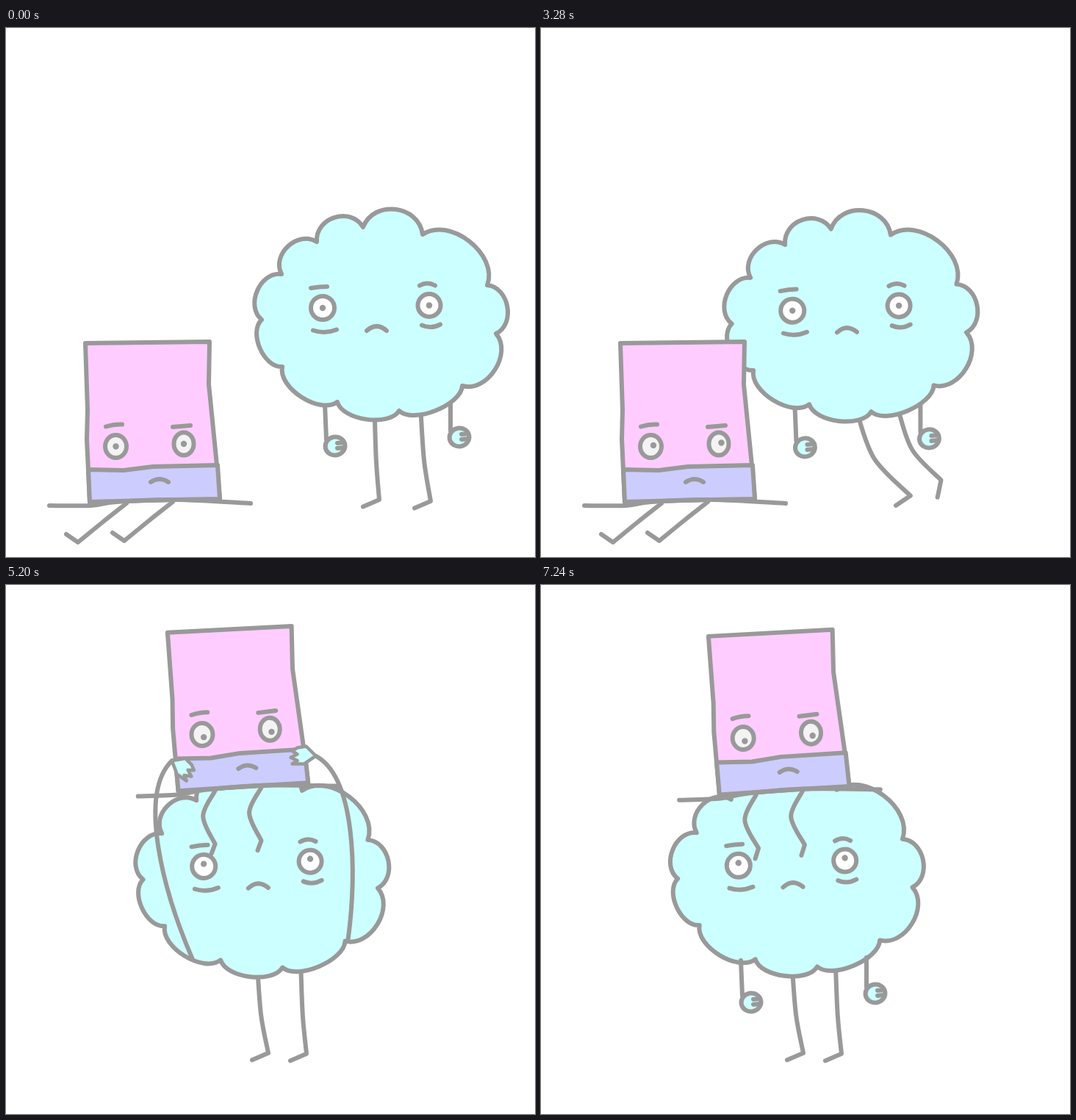
An HTML page with a canvas that plays this animation: 720 px wide and 720 px high, repeating every 8000 ms.

```html
<!DOCTYPE html>
<html lang="en">
<head>
<meta charset="utf-8">
<title>Cloud and hat</title>
<style>
  html, body { margin: 0; width: 100%; height: 100%; overflow: hidden; background: #fff; }
  canvas { display: block; width: 100vw; height: 100vh; }
</style>
</head>
<body>
<canvas id="stage" width="720" height="720"></canvas>
<script>
const ctx = document.getElementById('stage').getContext('2d');
const LOOP = 8000, STEP = 40;
const INK = '#999', CYAN = '#cff', PINK = '#fcf', LILAC = '#ccf';

/* ---------- timing and vector helpers ---------- */

const clamp = v => Math.max(0, Math.min(1, v));
const ramp = (t, a, b) => clamp((t - a) / (b - a));
const ease = p => p * p * (3 - 2 * p);
const pulse = (t, a, b) => Math.sin(Math.PI * ramp(t, a, b));
const rad = deg => deg * Math.PI / 180;
const mix = (a, b, k) => a.map((v, i) => v + (b[i] - v) * k);
const add = (a, x, y) => [a[0] + x, a[1] + y];
const spin = ([x, y], deg) => {
  const c = Math.cos(rad(deg)), s = Math.sin(rad(deg));
  return [x * c - y * s, x * s + y * c];
};

/* ---------- the story: everything follows from the time ---------- */

function poseAt(t) {
  const walk = ramp(t, 2840, 3600), lift = ease(ramp(t, 4920, 5240));
  const crouch = 11 * ramp(t, 3440, 3600) + 15 * ramp(t, 3720, 3920);
  const wobble = pulse(t, 6040, 6200) + pulse(t, 6560, 6720);
  const settle = ramp(t, 6560, 6720);
  const glance = ramp(t, 1920, 2000) - ramp(t, 2360, 2440);
  const notice = ramp(t, 1360, 1640);
  return {
    t, lift,
    cloud: {
      x: -153 * walk - 9 * lift,
      y: crouch - 27 * lift - 4 * Math.sin(2 * Math.PI * walk) + 4 * pulse(t, 5360, 5560),
      tilt: -1.3 * clamp(walk * 2),
      look: [-4 * glance, -3.5 * lift],
      open: 1 - .9 * (pulse(t, 680, 880) + pulse(t, 2640, 2720) + pulse(t, 4240, 4360))
    },
    hat: {
      x: 196 + 126 * lift + 3 * settle,
      y: 648.5 - 384.5 * lift + 20.5 * ramp(t, 5360, 5560) + settle - .7 * wobble,
      tilt: -2.4 * lift + 1.4 * wobble,
      look: mix([3.5 * notice, -1.5 * notice], [2, 4], lift),
      open: 1 - .9 * pulse(t, 5720, 5880)
    }
  };
}

/* ---------- pen helpers ---------- */

function line(points) {
  ctx.beginPath();
  points.forEach(p => ctx.lineTo(...p));
}

// Smooth curve through the points.
function curve(points) {
  const get = i => points[Math.max(0, Math.min(points.length - 1, i))];
  ctx.beginPath();
  ctx.moveTo(...points[0]);
  for (let i = 0; i < points.length - 1; i++) {
    const [a, b, c, d] = [get(i - 1), get(i), get(i + 1), get(i + 2)];
    ctx.bezierCurveTo(
      b[0] + (c[0] - a[0]) / 6, b[1] + (c[1] - a[1]) / 6,
      c[0] - (d[0] - b[0]) / 6, c[1] - (d[1] - b[1]) / 6, ...c);
  }
}

function paint(fill) {
  ctx.fillStyle = fill;
  ctx.fill();
  ctx.stroke();
}

function shape(points, fill) {
  line(points);
  ctx.closePath();
  paint(fill);
}

// A short stroke of width w, bent upwards by the given height.
function dash(x, y, w, bend, slope = 0) {
  ctx.beginPath();
  ctx.moveTo(x - w / 2, y + slope);
  ctx.quadraticCurveTo(x, y - 2 * bend, x + w / 2, y - slope);
  ctx.stroke();
}

function leg(hip, knee, ankle, toe) {
  curve([hip, knee, ankle]);
  ctx.lineTo(...toe);
  ctx.stroke();
}

function eye(x, y, rx, ry, white, { look, open }) {
  ctx.beginPath();
  ctx.ellipse(x, y, rx, ry * open, 0, 0, 7);
  paint(white);
  if (open < .4) return;
  ctx.beginPath();
  ctx.arc(x + look[0], y + look[1], 4.2, 0, 7);
  ctx.fillStyle = INK;
  ctx.fill();
}

function within({ x, y, tilt }, [px, py], body) {
  ctx.save();
  ctx.translate(x, y);
  ctx.rotate(rad(tilt));
  ctx.translate(-px, -py);
  body();
  ctx.restore();
}

/* ---------- cloud ---------- */

const CENTRE = [510, 390];
// Notches of the outline, each with the bulge of the bump that follows.
const notches = [
  [375, 335, .45], [423, 291, .49], [486, 271, .48], [567, 281, .38],
  [655, 350, .43], [667, 416, .4], [621, 487, .26], [535, 521, .28],
  [451, 509, .31], [376, 461, .34], [348, 397, .42]
];

function cloudOutline() {
  ctx.beginPath();
  ctx.moveTo(notches[0][0], notches[0][1]);
  notches.forEach(([x, y, bulge], i) => {
    const [ex, ey] = notches[(i + 1) % notches.length];
    const dx = ex - x, dy = ey - y, inset = .12;
    const ox = dy * bulge, oy = -dx * bulge;
    ctx.bezierCurveTo(x + ox + dx * inset, y + oy + dy * inset,
      ex + ox - dx * inset, ey + oy - dy * inset, ex, ey);
  });
  ctx.closePath();
}

function drawCloud({ cloud }) {
  const place = { ...cloud, x: cloud.x + CENTRE[0], y: cloud.y + CENTRE[1] };
  within(place, CENTRE, () => {
    cloudOutline();
    paint(CYAN);
    eye(431, 381, 16, 16, '#fff', cloud);
    eye(576, 377.5, 15.5, 15.5, '#fff', cloud);
    dash(426, 353, 22, .5, 1);
    dash(573.5, 350.5, 21, 3);
    dash(434, 411, 32, -3, .5);
    dash(578.5, 404, 25, -3, .5);
    dash(504.5, 412, 27, 6);
  });
}

// A foot keeps its place, then swings to its goal; the knee bends with crouch and stride.
function drawCloudLeg({ t, cloud }, hipX, from, to, start, end) {
  const p = ramp(t, start, end), rise = 45 * Math.sin(Math.PI * p) ** 2;
  const ankle = add(mix(from, to, ease(p)), 0, -rise);
  const base = hipX + cloud.x, stride = ankle[0] - base;
  const hip = [base + .2 * stride, 520 + cloud.y];
  const bend = .8 * Math.max(0, cloud.y) + .17 * Math.abs(stride);
  const knee = add(mix(hip, ankle, .56), -bend, 0);
  leg(hip, knee, ankle, add(ankle, ...spin([-22, 9.5], -2 * rise)));
}

function drawCloudLegs(pose) {
  drawCloudLeg(pose, 500, [508, 642], [357, 637], 3240, 3600);
  drawCloudLeg(pose, 561, [578, 644], [409, 638], 3200, 3480);
}

/* ---------- arms: hands move between hanging and gripping the hat ---------- */

function drawFist([x, y]) {
  ctx.beginPath();
  ctx.ellipse(x, y, 13.5, 12.5, -.2, 0, 7);
  paint(CYAN);
  for (const dy of [-4, 3]) {
    line([[x + 3, y + dy], [x + 12, y + dy - 1]]);
    ctx.stroke();
  }
}

function drawGrip([x, y], side, turn) {
  const outline = [[18, 0], [2, 11]];
  for (let i = 0; i < 6; i++) outline.push([i % 2 ? -7 : -16 + Math.abs(i - 2), 11 - 4.4 * i]);
  outline.push([5, -13]);
  ctx.save();
  ctx.translate(x, y);
  ctx.rotate(rad(turn));
  ctx.scale(side, 1);
  ctx.lineWidth = 4.5;
  shape(outline, CYAN);
  ctx.restore();
}

function drawArm({ t, cloud, hat }, side, arm) {
  const release = ramp(t, 6880, 7240);
  const hold = (arm.reach * ramp(t, ...arm.when) + (1 - arm.reach) * ramp(t, 4920, 5040)) * (1 - release);
  const hang = add(arm.hang, cloud.x, cloud.y);
  const hand = add(mix(hang, add(arm.grip, hat.x, hat.y), hold), side * 80 * Math.sin(Math.PI * release), 0);
  const shoulder = add(mix(arm.low, arm.high, hold), cloud.x, cloud.y);
  const high = clamp((shoulder[1] - hand[1]) / 200);
  const gripping = hold > .4;
  const turn = side > 0 ? -60 * (1 - high) : 35;
  const wrist = add(hand, ...(gripping ? spin([18 * side, 0], turn) : [-12, -9]));

  const [dx, dy] = [wrist[0] - shoulder[0], wrist[1] - shoulder[1]];
  const bow = (along, out) => [
    shoulder[0] + dx * along - dy * out * high * side,
    shoulder[1] + dy * along + dx * out * high * side
  ];
  ctx.beginPath();
  ctx.moveTo(...shoulder);
  ctx.bezierCurveTo(...bow(.35, .11), ...bow(.85, .19), ...wrist);
  ctx.stroke();
  if (gripping) drawGrip(hand, side, turn);
  else drawFist(hand);
}

const leftArm = {
  low: [434, 512], high: [415, 508], hang: [448, 569], grip: [-76, -31], reach: .8, when: [4240, 4360]
};
const rightArm = {
  low: [605, 508], high: [627, 484], hang: [617, 557], grip: [87, -48], reach: .46, when: [4480, 4520]
};

function drawArms(pose) {
  drawArm(pose, -1, leftArm);
  drawArm(pose, 1, rightArm);
}

/* ---------- hat ---------- */

const sitting = [[-33, 26], [-66, 53], [-82, 42]];
const dangling = [[-17, 34], [0, 73], [-5, 87]];

function drawHat({ lift, hat }) {
  within(hat, [196, 648.5], () => {
    for (const hip of [[164, 647], [227, 645]])
      leg(hip, ...sitting.map((p, i) => add(hip, ...mix(p, dangling[i], lift))));

    const brim = [[291, 641], [230, 642], [114, 645]];
    const band = [[112, 601], [160, 602], [200, 597], [288, 595]];
    shape([[108, 429], [277, 427], [276, 485], [287, 595], ...brim, [110, 560], [111, 520]], PINK);
    shape([...band, ...brim], LILAC);
    curve([[59, 650], [115, 650], [150, 645], [230, 642], [333, 647]]);
    ctx.stroke();

    eye(149.5, 569.5, 14.5, 15.5, '#f3f3f3', hat);
    eye(242, 566, 13.5, 15.5, '#f3f3f3', hat);
    dash(147, 541, 22, 1, 1.5);
    dash(239, 542, 24, 0, 1);
    dash(209, 618, 24, 4);
  });
}

/* ---------- loop ---------- */

function draw(t) {
  ctx.fillStyle = '#fff';
  ctx.fillRect(0, 0, 720, 720);
  ctx.strokeStyle = INK;
  ctx.lineWidth = 6;
  ctx.lineCap = ctx.lineJoin = 'round';

  const pose = poseAt(t), armsInFront = t > 4920;
  drawCloudLegs(pose);
  if (!armsInFront) drawArms(pose);
  drawCloud(pose);
  drawHat(pose);
  if (armsInFront) drawArms(pose);
}

const start = performance.now();
function frame() {
  const t = (performance.now() - start) % LOOP;
  draw(Math.floor(t / STEP) * STEP);
  requestAnimationFrame(frame);
}
frame();
</script>
</body>
</html>
```
